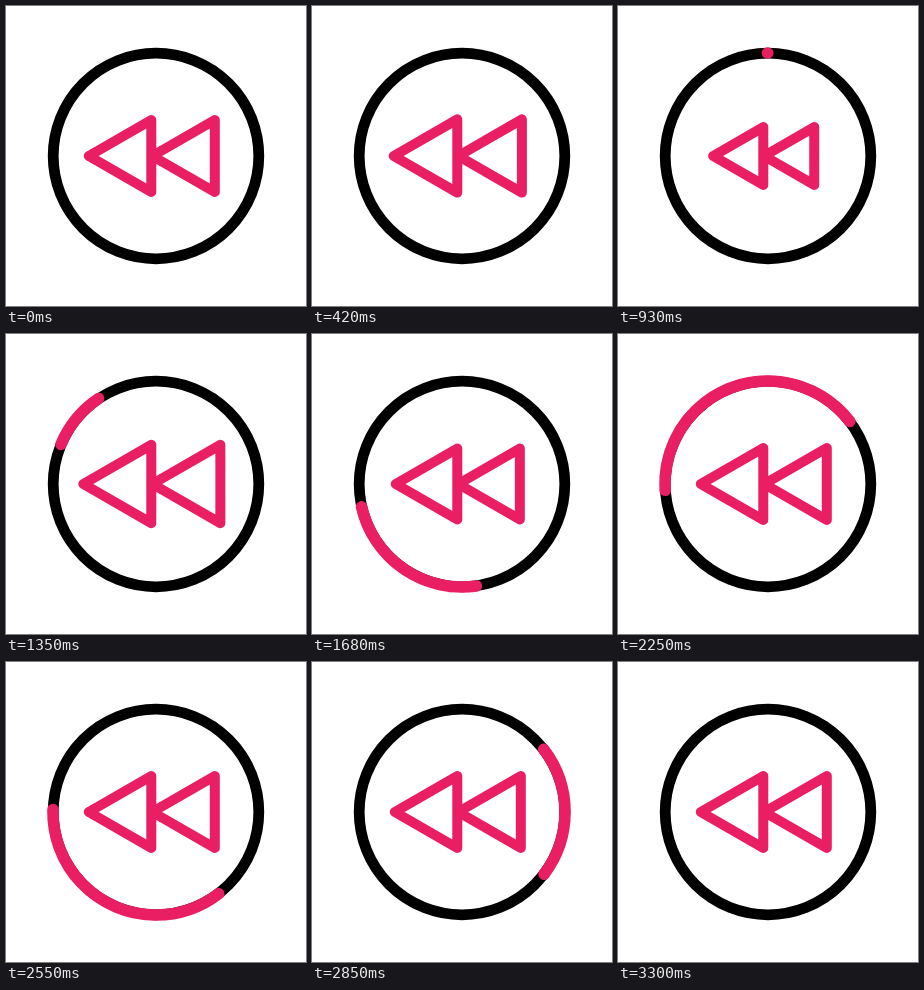
An HTML page with a canvas that plays this animation: 300 by 300 pixels, repeating every 4080 ms.

```html
<!DOCTYPE html>
<html lang="en">
<head>
<meta charset="utf-8">
<title>Rewind</title>
<style>
  html, body { margin: 0; width: 100%; height: 100%; overflow: hidden; background: #fff; }
  canvas { display: block; width: 300px; height: 300px; }
</style>
</head>
<body>
<canvas id="stage" width="300" height="300"></canvas>
<script>
const ctx = document.getElementById('stage').getContext('2d');
const LOOP = 4080, STEP = 30;
const PINK = '#e91e63', BLACK = '#000';
const ARC_START = 900, ARC_END = 3300;
const TOP = -Math.PI / 2;

// Cubic ease from (0,0) to (1,1) with flat handles at x1 and x2.
function ease(x, x1, x2) {
  let lo = 0, hi = 1;
  for (let i = 0; i < 30; i++) {
    const s = (lo + hi) / 2, r = 1 - s;
    if (3 * r * r * s * x1 + 3 * r * s * s * x2 + s * s * s < x) lo = s;
    else hi = s;
  }
  return lo * lo * (3 - 2 * lo);
}

// [time, scale] of the arrows
const PULSE = [[0, 1], [240, 1.1], [800, 0.76], [1380, 1.09], [1680, 0.985], [2010, 1]];

function pulse(t) {
  for (let i = 1; i < PULSE.length; i++) {
    const [t0, a] = PULSE[i - 1], [t1, b] = PULSE[i];
    if (t < t1) return a + (b - a) * ease((t - t0) / (t1 - t0), 1 / 3, 2 / 3);
  }
  return 1;
}

function stroke(color, width) {
  ctx.strokeStyle = color;
  ctx.lineWidth = width;
  ctx.stroke();
}

function drawRing() {
  ctx.beginPath();
  ctx.arc(150, 150, 102.8, 0, 2 * Math.PI);
  stroke(BLACK, 10.8);
}

// The arc runs two turns counterclockwise; its tail lags behind its head.
function drawArc(t) {
  if (t <= ARC_START || t >= ARC_END) return;
  const u = (t - ARC_START) / (ARC_END - ARC_START);
  const head = 4 * Math.PI * ease(u, 0.345, 0.6);
  const tail = 4 * Math.PI * ease(u, 0.505, 0.79);
  ctx.beginPath();
  ctx.arc(150, 150, 103, TOP - tail, TOP - head, true);
  stroke(PINK, 11.6);
}

function drawArrows(scale) {
  ctx.beginPath();
  for (const tip of [-62.5, 1]) {
    const point = (x, y) => [145.3 + x * scale, 150 + y * scale];
    ctx.moveTo(...point(tip, 0));
    ctx.lineTo(...point(tip + 62.5, -36));
    ctx.lineTo(...point(tip + 62.5, 36));
    ctx.closePath();
  }
  stroke(PINK, 10);
}

function draw(t) {
  ctx.fillStyle = '#fff';
  ctx.fillRect(0, 0, 300, 300);
  drawRing();
  drawArc(t);
  drawArrows(pulse(t));
}

ctx.lineCap = ctx.lineJoin = 'round';
const start = performance.now();
function tick() {
  const t = (performance.now() - start) % LOOP;
  draw(Math.floor(t / STEP) * STEP);
  requestAnimationFrame(tick);
}
tick();
</script>
</body>
</html>
```
